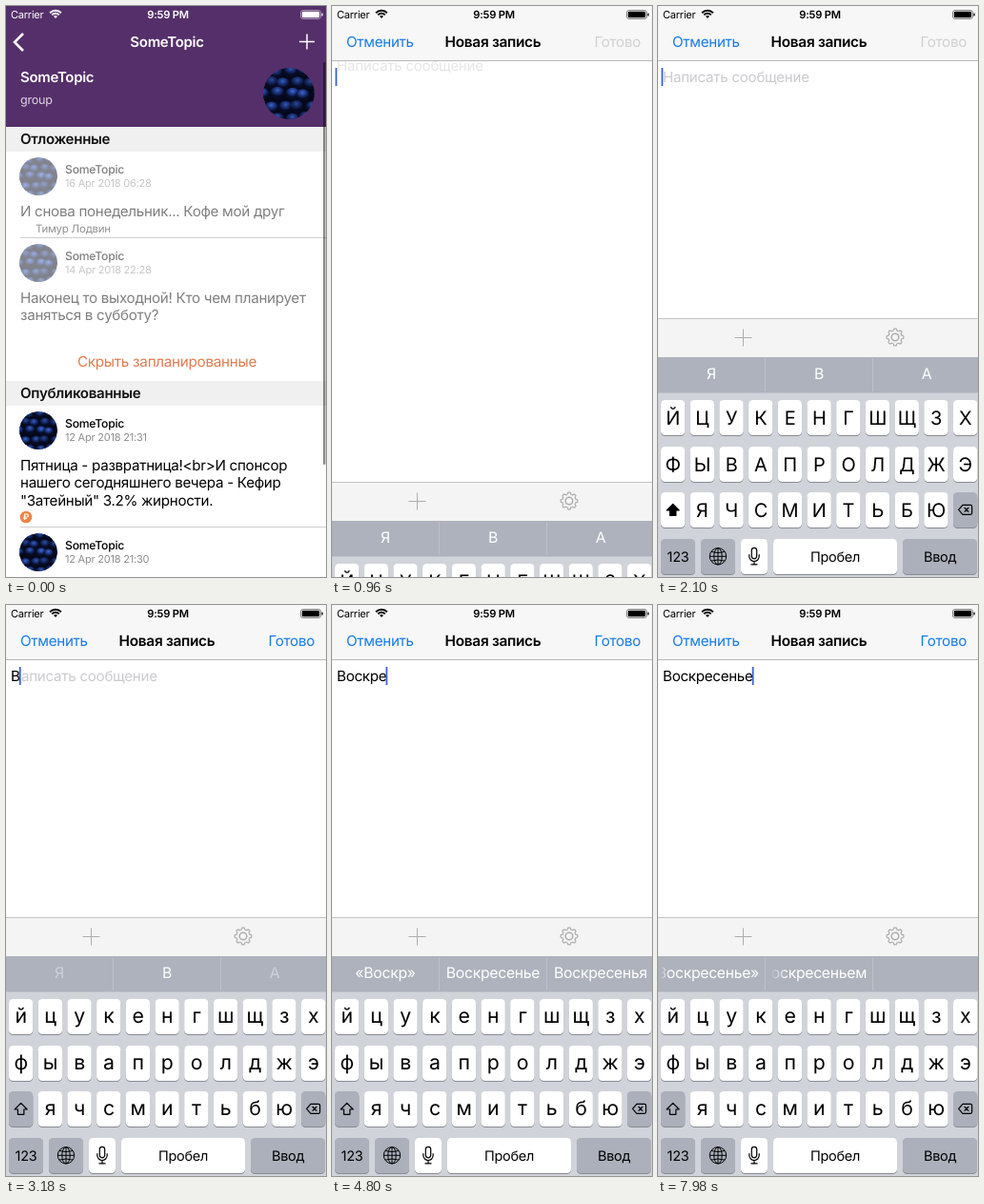
Write an HTML page that moves like this. It is 336 by 600 pixels and loops after 8 s.

```html
<!DOCTYPE html>
<html lang="ru">
<head>
<meta charset="utf-8">
<title>Новая запись</title>
<style>
  html, body { margin: 0; width: 100%; height: 100%; overflow: hidden; background: #fff; }
  svg { display: block; }
  text {
    font-family: Inter, "Open Sans", sans-serif; letter-spacing: -.02em;
    white-space: pre; text-rendering: geometricPrecision;
  }
</style>
</head>
<body>
<svg id="stage" width="336" height="600" viewBox="0 0 336 600"></svg>
<script>
const LOOP = 8000, WORD = 'Воскресенье';
const SLIDE_START = 400, KEYBOARD_START = 911, TYPE_START = 3150, SUGGEST_LAG = 200;
const BLUE = '#167be8', GREY_KEY = '#abb0ba', BAR = '#adb2bc';
const COLUMN = 30.7;

// Markup helpers
const text = (x, y, str, size = 15.2, fill = '#000', extra = '') =>
  `<text x="${x}" y="${y}" font-size="${size}" fill="${fill}" ${extra}>${str.replace(/</g, '&lt;')}</text>`;
const rect = (x, y, w, h, fill, extra = '') =>
  `<rect x="${x}" y="${y}" width="${w}" height="${h}" fill="${fill}" ${extra}/>`;
const stroke = (d, color, width = 1) =>
  `<path d="${d}" fill="none" stroke="${color}" stroke-width="${width}"/>`;
const at = (x, y, body) => `<g transform="translate(${x} ${y})">${body}</g>`;
const MID = 'text-anchor="middle" ', SEMI = 'font-weight="600" ', MEDIUM = 'font-weight="500" ';

function berries() {
  let seed = 11, out = '<circle r="20" fill="#05081a"/>';
  const random = () => (seed = seed * 16807 % 2147483647) / 2147483647;
  for (let row = -2; row <= 2; row++) {
    for (let col = -2; col <= 2; col++) {
      const x = col * 10.5 + (row & 1) * 5 + random() * 3, y = row * 9 + random() * 3 - 1;
      out += `<ellipse cx="${x}" cy="${y}" rx="5.6" ry="4.6" fill="url(#berry)" opacity="${.6 + random() * .4}"/>`;
    }
  }
  return `<g id="berries" clip-path="url(#round)">${out}</g>`;
}
const avatar = (x, y, r) => `<use href="#berries" transform="translate(${x} ${y}) scale(${r / 20})"/>`;

function post(y, date, lines, opacity = 1) {
  const body = avatar(34, y, 20) +
    text(62, y - 3, 'SomeTopic', 12.2, '#000', MEDIUM) +
    text(62, y + 11, date, 11, '#8d8d8d') +
    lines.map((line, i) => text(15, y + 42 + i * 18.4, line)).join('');
  return `<g opacity="${opacity}">${body}</g>`;
}
const section = (y, title) => rect(0, y, 336, 26, '#f0f0f0') + text(15, y + 18.3, title, 15.1, '#111', SEMI);

function groupScreen() {
  return rect(0, 0, 336, 600, '#fff') + rect(0, 0, 336, 127, '#552f69') +
    stroke('M18 29L9 38L18 47', '#fff', 2.6) + stroke('M308 37.5H324M316 29.5V45.5', '#fff', 1.5) +
    text(169, 43, 'SomeTopic', 15, '#fff', MID + SEMI) +
    text(15, 80, 'SomeTopic', 15, '#fff', SEMI) + text(15, 103, 'group', 12.6, '#ddd5e2') +
    avatar(297, 92, 27) +
    section(127, 'Отложенные') +
    post(179, '16 Apr 2018 06:28', ['И снова понедельник... Кофе мой друг'], .5) +
    text(31, 237.5, 'Тимур Лодвин', 11.5, '#909090') +
    rect(15, 243, 321, 1, '#cfcfcf') +
    post(270, '14 Apr 2018 22:28', ['Наконец то выходной! Кто чем планирует', 'заняться в субботу?'], .5) +
    text(169, 379, 'Скрыть запланированные', 15.3, '#df7b4e', MID) +
    section(394, 'Опубликованные') +
    post(446, '12 Apr 2018 21:31', ['Пятница - развратница!<br>И спонсор',
      'нашего сегодняшнего вечера - Кефир', '"Затейный" 3.2% жирности.']) +
    '<circle cx="21" cy="537" r="6.3" fill="#ee8544"/>' + text(21, 540.3, '₽', 9, '#fff', MID + SEMI) +
    rect(15, 547, 321, 1, '#cfcfcf') +
    post(574, '12 Apr 2018 21:30', []) +
    rect(333, 59, 2.5, 423, '#000', 'id="scroller" rx="1.2" opacity=".45"');
}

function key(x, row, w, body, fill = '#fff', id = '') {
  const y = Math.round(414 + row * 48.6);
  return rect(x, y + 1, w, 37, '#888b91', 'rx="4.5"') +
    rect(x, y, w, 37, fill, `rx="4.5" ${id && `id="${id}"`}`) + at(x + w / 2, y + 18.3, body);
}

function gear() {
  const points = Array.from({ length: 97 }, (_, i) => {
    const a = i / 96 * 2 * Math.PI, r = 8 + Math.max(-.9, Math.min(.9, 1.8 * Math.cos(8 * a)));
    return `${(r * Math.cos(a)).toFixed(2)} ${(r * Math.sin(a)).toFixed(2)}`;
  });
  return stroke(`M${points.join('L')}Z`, '#adadad', 1.2) +
    '<circle r="3.8" fill="none" stroke="#adadad" stroke-width="1.5"/>';
}

function keyboard() {
  const globe = '<g fill="none" stroke="#000"><circle r="8.7"/><ellipse rx="4.2" ry="8.7"/></g>' +
    stroke('M-8.7 0H8.7M0 -8.7V8.7M-7 -4.8Q0 -2.6 7 -4.8M-7 4.8Q0 2.6 7 4.8', '#000');
  const mic = rect(-2.7, -9, 5.4, 11.5, 'none', 'rx="2.7" stroke="#000" stroke-width="1.2"') +
    stroke('M-5.2 -2V0A5.2 5.2 0 0 0 5.2 0V-2M0 5.2V8.5M-3.5 8.5H3.5', '#000', 1.2);
  const shift = '<path id="arrow" d="M0 -6L6.5 .7H3.2V6H-3.2V.7H-6.5Z" stroke="#000" stroke-width="1.2" stroke-linejoin="round"/>';
  const erase = stroke('M-7 0L-2.7 -5H5.5Q7 -5 7 -3.5V3.5Q7 5 5.5 5H-2.7ZM-1 -2.3L3.6 2.3M3.6 -2.3L-1 2.3', '#000', 1.2);
  const label = str => text(0, 5.2, str, 14.5, '#000', MID);

  let out = rect(0, 328, 336, 41, '#f4f4f4') + rect(0, 328, 336, 1, '#c4c4c4') +
    stroke('M80.5 348.5H98.5M89.5 339.5V357.5', '#adadad') + at(249, 348, gear()) +
    rect(0, 369, 336, 38, BAR) + rect(0, 406.5, 336, 194, '#d0d3d9');
  for (let i = 0; i < 3; i++) {
    out += `<svg x="${i * 113}" y="369" width="112" height="37"><text class="hint" y="22.5" font-size="15.8" fill="#fff"/>` +
      rect(0, 0, i ? 22 : 12, 37, 'url(#fade)', 'class="veil"') + '</svg>';
  }
  out += rect(112, 370, 1, 35, '#bcc0c8') + rect(225, 370, 1, 35, '#bcc0c8');
  ['йцукенгшщзх', 'фывапролджэ', 'ячсмитьбю'].forEach((letters, row) =>
    [...letters].forEach((letter, i) => {
      const x = 3 + (i + (row === 2)) * COLUMN;
      out += key(x, row, 25.3, `<text class="letter" text-anchor="middle">${letter}</text>`);
    }));
  return out + key(3, 2, 25.3, shift, '#fff', 'shift') + key(3 + 10 * COLUMN, 2, 25.3, erase, GREY_KEY) +
    key(3, 3, 36, label('123'), GREY_KEY) + key(45, 3, 36, globe, GREY_KEY) + key(87, 3, 28, mic) +
    key(121, 3, 130, label('Пробел')) + key(257, 3, 78, label('Ввод'), GREY_KEY);
}

function composer() {
  return rect(0, 0, 336, 600, '#fff') +
    text(5, 80, 'Написать сообщение', 15.2, '#cbcbcf', 'id="placeholder"') +
    text(5, 80, '', 15.2, '#000', 'id="typed"') +
    rect(0, 65, 1.8, 19, '#3c62d2', 'id="caret"') +
    rect(0, 0, 336, 57, '#f7f7f7') + rect(0, 57, 336, 1, '#b9b9b9') +
    text(15, 43.3, 'Отменить', 15.2, BLUE) +
    text(169, 43.3, 'Новая запись', 15.4, '#000', MID + SEMI) +
    text(324, 43.3, 'Готово', 15.2, '#d0d0d0', 'id="done" text-anchor="end"') +
    `<g id="keyboard">${keyboard()}</g>`;
}

function statusBar() {
  const arc = r => stroke(`M${-r * .72} ${-r * .7}A${r} ${r} 0 0 1 ${r * .72} ${-r * .7}`, 'currentColor', 1.9);
  return text(5, 13, 'Carrier', 11, 'currentColor') +
    at(52, 13, arc(8.2) + arc(5.2) + '<path d="M0 0L-2 -2.2A3 3 0 0 1 2 -2.2Z" fill="currentColor"/>') +
    text(170, 13, '9:59 PM', 11.2, 'currentColor', MID + SEMI) +
    rect(309.5, 4.5, 21, 9, 'none', 'rx="2.3" stroke="currentColor" stroke-opacity=".45"') +
    rect(310.8, 5.8, 18.4, 6.4, 'currentColor', 'rx="1.2"') + rect(331.4, 7.5, 1.3, 3, 'currentColor', 'rx=".6"');
}

const $ = id => document.getElementById(id);
$('stage').innerHTML = `<defs><clipPath id="round"><circle r="20"/></clipPath>
  <radialGradient id="berry" cy=".3"><stop stop-color="#4670d4"/><stop offset=".45" stop-color="#1f3f98"/>
    <stop offset="1" stop-color="#070c26"/></radialGradient>
  <linearGradient id="fade"><stop offset=".2" stop-color="${BAR}"/><stop offset="1" stop-color="${BAR}" stop-opacity="0"/></linearGradient>
  ${berries()}</defs>` + groupScreen() + `<g id="composer">${composer()}</g><g id="status">${statusBar()}</g>`;
const letters = [...document.querySelectorAll('.letter')];
const hints = [...document.querySelectorAll('.hint')];
const veils = [...document.querySelectorAll('.veil')];

// Remaining distance of a critically damped spring, 1 to 0
const spring = elapsed => {
  const u = Math.max(0, elapsed) * .0196;
  return (1 + u) * Math.exp(-u);
};
const letterTime = i => i < 6 ? TYPE_START + 312 * i : 4710 + 214 * (i - 5);
const typedCount = t => [...WORD].filter((_, i) => t >= letterTime(i)).length;
const clamp = v => Math.max(0, Math.min(1, v));

function suggestions(count) {
  if (!count) return ['Я', 'В', 'А'];
  const quoted = `«${WORD.slice(0, count)}»`;
  if (count === 1) return [quoted, 'В', 'Все'];
  if (count === 2) return [quoted, 'Вот', 'Вообще'];
  if (count === WORD.length) return [quoted, 'Воскресеньем', ''];
  return [quoted, 'Воскресенье', 'Воскресенья'];
}

function setCaps(caps) {
  letters.forEach(el => {
    el.textContent = caps ? el.textContent.toUpperCase() : el.textContent.toLowerCase();
    el.setAttribute('font-size', caps ? 20 : 21.3);
    el.setAttribute('y', caps ? 7.2 : 6.4);
  });
  $('shift').setAttribute('fill', caps ? '#fff' : GREY_KEY);
  $('arrow').setAttribute('fill', caps ? '#000' : 'none');
}

function setHints(words, fading) {
  words.forEach((word, i) => {
    const long = word.length > 11;
    hints[i].textContent = word;
    hints[i].setAttribute('x', long ? 106 : 56);
    hints[i].setAttribute('text-anchor', long ? 'end' : 'middle');
    hints[i].setAttribute('opacity', fading && i !== 1 ? .4 : 1);
    veils[i].setAttribute('visibility', long ? 'visible' : 'hidden');
  });
}

let capsShown = null;
function draw(t) {
  const below = t < SLIDE_START ? 1 : spring(t - SLIDE_START);
  const rise = spring(t - KEYBOARD_START);
  const count = typedCount(t), caps = count === 0;

  $('scroller').setAttribute('opacity', .45 * clamp(1 - (t - 150) / 300));
  $('composer').setAttribute('transform', `translate(0 ${Math.round(600 * below)})`);
  const shade = Math.round(255 * below);
  $('status').setAttribute('color', `rgb(${shade},${shade},${shade})`);

  $('keyboard').setAttribute('transform', `translate(0 ${Math.round(232 * rise)})`);
  $('placeholder').setAttribute('y', 80 - 16 * rise);
  $('placeholder').setAttribute('opacity', 1 - .7 * rise);
  $('placeholder').setAttribute('visibility', t < TYPE_START + 80 ? 'visible' : 'hidden');
  $('typed').textContent = WORD.slice(0, count);
  $('done').setAttribute('fill', caps ? '#d0d0d0' : BLUE);

  const sinceKey = t - (caps ? KEYBOARD_START : letterTime(count - 1));
  const phase = sinceKey % 1000;
  const blink = phase < 700 ? clamp(1 - (phase - 500) / 150) : clamp((phase - 850) / 150);
  $('caret').setAttribute('opacity', sinceKey < 0 ? 0 : blink);
  $('caret').setAttribute('x', caps ? 3.5 : 4.2 + $('typed').getComputedTextLength());

  if (caps !== capsShown) setCaps(capsShown = caps);
  setHints(suggestions(typedCount(t - SUGGEST_LAG)), t >= TYPE_START && t < TYPE_START + SUGGEST_LAG);
}

const start = performance.now();
function tick() {
  draw((performance.now() - start) % LOOP);
  requestAnimationFrame(tick);
}
tick();
</script>
</body>
</html>
```
